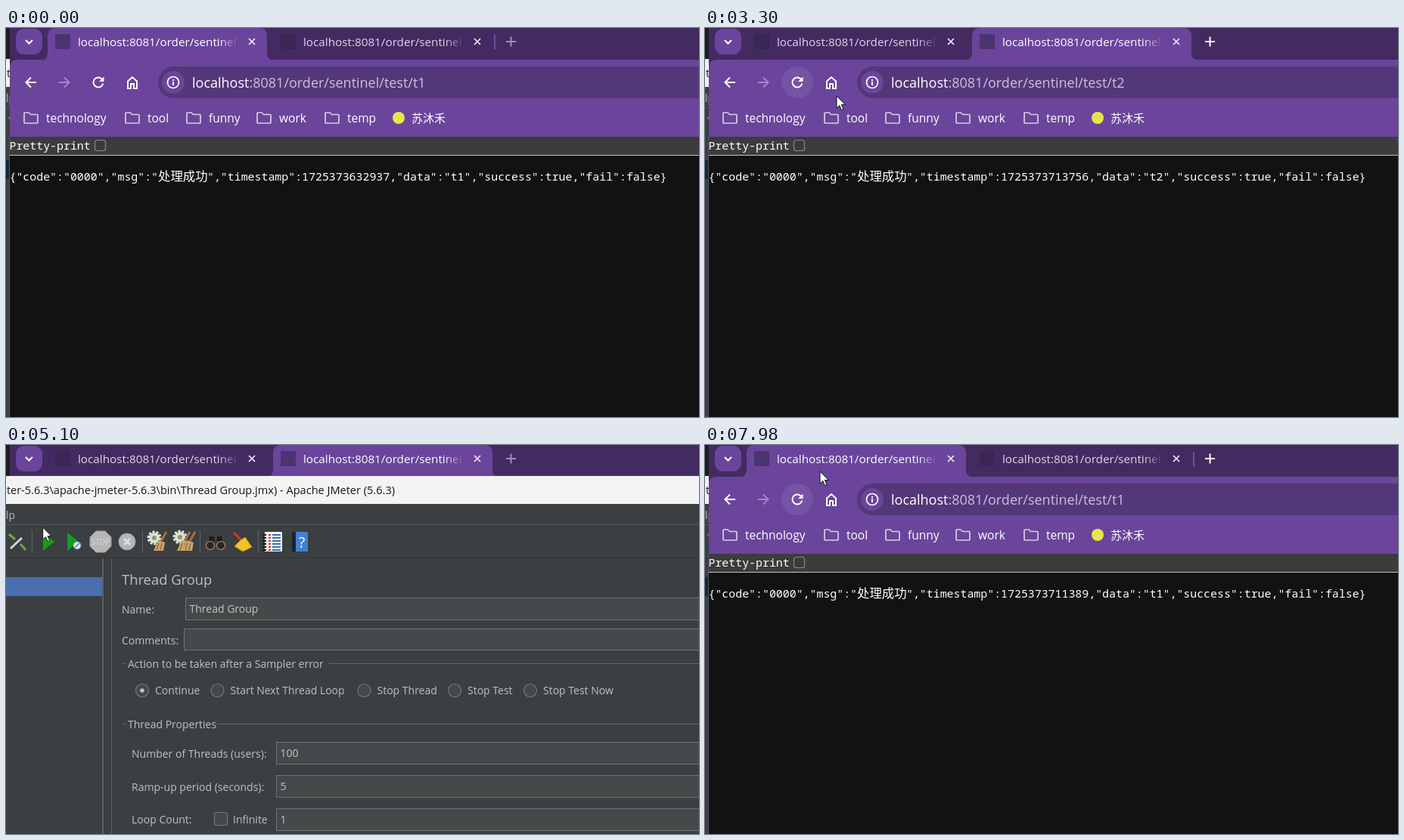
Write an HTML page with a canvas that moves like this. It is 916x515 px and loops after 8000 ms.

```html
<!DOCTYPE html>
<html lang="zh">
<head>
<meta charset="utf-8">
<title>Load test</title>
<style>
html, body { margin: 0; width: 100%; height: 100%; overflow: hidden; background: #121212; }
canvas { display: block; }
</style>
</head>
<body>
<canvas id="stage" width="916" height="515"></canvas>
<script>
const c = document.getElementById('stage').getContext('2d');
const SANS = '"Open Sans", "Noto Sans CJK SC", "Noto Sans CJK", sans-serif';
const MONO = '"Noto Sans Mono", "Noto Sans CJK SC", monospace';
const STRIP = '#432b62', PURPLE = '#6a459b', PILL = '#533879', HOVER = '#7653a4';
const LOOP = 8000, FRONT_ON = 4350, FRONT_OFF = 6120;

// Pointer keys: time, x, y
const paths = [
  [[60, 898, 496], [420, 520, 290], [720, 128, 80], [840, 121, 72], [900, 121, 72],
   [1170, 444, 14], [1680, 450, 13], [2040, 200, 112], [2370, 119, 74], [2940, 119, 74],
   [3300, 174, 90], [3690, 185, 60], [3840, 117, 28], [3990, 117, 28], [4290, 245, 530]],
  [[4560, 249, 452], [4980, 44, 96], [5250, 55, 127], [5430, 55, 127], [6000, 465, 12],
   [6270, 465, 12], [6660, 117, 90], [7050, 121, 72], [7410, 121, 72], [7650, 150, 13],
   [7780, 150, 13], [7980, 152, 35], [8000, 152, 35]]
];

function pointer(t) {
  for (const path of paths)
    for (let i = 1; i < path.length; i++) {
      const [t0, x0, y0] = path[i - 1], [t1, x1, y1] = path[i];
      if (t >= t0 && t < t1) {
        let u = (t - t0) / (t1 - t0);
        u = u * u * (3 - 2 * u);
        return [x0 + (x1 - x0) * u, y0 + (y1 - y0) * u];
      }
    }
  return [-99, -99];
}

function rect(x, y, w, h, color) {
  c.fillStyle = color;
  c.fillRect(x, y, w, h);
}
function round(x, y, w, h, r, fill, stroke, width = 1) {
  c.beginPath();
  c.roundRect(x, y, w, h, r);
  paint(fill, stroke, width);
}
function circle(x, y, r, fill, stroke, width = 1) {
  c.beginPath();
  c.arc(x, y, r, 0, 7);
  paint(fill, stroke, width);
}
function paint(fill, stroke, width) {
  if (fill) { c.fillStyle = fill; c.fill(); }
  if (stroke) { c.strokeStyle = stroke; c.lineWidth = width; c.stroke(); }
}
function shape(d, x, y, fill, stroke, width = 2) {
  const p = new Path2D(d);
  c.save();
  c.translate(x, y);
  if (fill) { c.fillStyle = fill; c.fill(p); }
  if (stroke) { c.strokeStyle = stroke; c.lineWidth = width; c.stroke(p); }
  c.restore();
}
function text(s, x, y, size, color, family = SANS, align = 'left') {
  c.font = size + 'px ' + family;
  c.textAlign = align;
  c.fillStyle = color;
  c.fillText(s, x, y);
}
const inside = ([x, y], x0, y0, x1, y1) => x >= x0 && x < x1 && y >= y0 && y < y1;

function tab(x, active, hover) {
  if (active)
    shape('M-11 43Q0 43 0 32V11Q0 0 11 0H279Q290 0 290 11V32Q290 43 301 43Z', x, 0, PURPLE);
  else if (hover)
    round(x, 0, 289, 35, 11, '#57397c');
  rect(x + 10, 8, 20, 20, active ? '#4b3570' : '#3a2854');
  const fade = c.createLinearGradient(x + 226, 0, x + 252, 0);
  fade.addColorStop(0, active ? '#fff' : '#ded6e8');
  fade.addColorStop(1, 'rgba(255,255,255,0)');
  text('localhost:8081/order/sentinel', x + 40, 24, 15.25, fade);
  shape('M-4 -4L4 4M4 -4L-4 4', x + 270, 18, null, '#f3eef8', 1.7);
}

const bookmarks = [['technology', 13, 129], ['tool', 147, 77], ['funny', 228, 90],
                   ['work', 321, 85], ['temp', 411, 86], ['苏沐禾', 500, 91]];

function browser(t, mouse, front) {
  const second = t >= 1350 && t < 7740;
  const focused = t >= 810 && t < 4410 || t >= FRONT_OFF;
  const tabHover = x => inside(mouse, x, 0, x + 290, 40);

  rect(5, 0, 911, 515, '#121212');
  rect(5, 0, 911, 52, STRIP);
  round(13, 1, 35, 34, 11, PURPLE);
  shape('M-4.5 -2L0 2.5L4.5 -2', 30.5, 18, null, '#fff', 2);
  tab(55, !second, tabHover(55));
  tab(353, second, tabHover(353));
  if (!second && !tabHover(353)) rect(645, 9, 2, 19, '#70509d');
  shape('M-6.5 0H6.5M0 -6.5V6.5', 667.5, 18, null, focused ? '#fff' : '#a18fb5', 2);

  shape('M0 10Q0 0 10 0H911V102H0Z', 5, 42, PURPLE);
  if (t >= 740 && t < FRONT_ON || t >= 6920) circle(122, 72, 21, HOVER);
  const arrow = 'M7 0H-6M0 -6.5L-6.5 0L0 6.5';
  shape(arrow, 33, 72, null, '#fff');
  c.save();
  c.translate(77, 72);
  c.scale(-1, 1);
  shape(arrow, 0, 0, null, '#a487c8');
  c.restore();
  c.beginPath();
  c.arc(122, 72, 6.5, 0.25, 5.6);
  paint(null, '#fff', 2);
  shape('M7.5 -7.5V-1H1Z', 122, 72, '#fff');
  shape('M-6 -1.5L0 -7L6 -1.5V8H2V2H-2V8H-6Z', 167, 72, null, '#fff');

  round(201, 51, 750, 42, 21, PILL);
  circle(221, 72, 15, PURPLE);
  circle(221, 72, 7.5, null, '#fff', 1.7);
  rect(220, 71, 2, 5, '#fff');
  rect(220, 68, 2, 2, '#fff');
  text('localhost', 246, 79, 18, '#fff');
  const host = c.measureText('localhost').width;
  const page = second ? 't2' : 't1';
  text(':8081/order/sentinel/test/' + page, 246 + host, 79, 18, '#cdc0dd');

  for (const [name, x, w] of bookmarks) {
    if (front && inside(mouse, x, 101, x + w, 137)) round(x, 101, w, 36, 18, HOVER);
    if (x < 500) shape('M1 2Q1 1 2 1H7L9.5 3.5H18Q19 3.5 19 4.5V14Q19 15 18 15H2Q1 15 1 14Z', x + 10, 111, null, '#d8cfe3', 1.7);
    else circle(519, 119, 8, '#e6e64a');
    text(name, x < 500 ? x + 40 : 536, 125, x < 500 ? 15.5 : 15, '#fff');
  }

  rect(5, 144, 911, 24, '#3c3c3c');
  rect(5, 168, 911, 1, '#c4c4c4');
  text('Pretty-print', 4.5, 161, 14.9, '#fff', MONO);
  round(117.5, 148.5, 14, 14, 3, '#3b3b3b', '#8a8a8a', 1.2);

  const stamp = second
    ? (t < 2970 ? 1725373634516 : t < 7170 ? 1725373713756 : 1725373717892)
    : (t < 870 ? 1725373632937 : 1725373711389);
  text('{"code":"0000","msg":"', 4.5, 202, 14.9, '#fff', MONO);
  text('处理成功', 201, 202, 16.4, '#fff');
  text(`","timestamp":${stamp},"data":"${page}","success":true,"fail":false}`, 266, 202, 14.9, '#fff', MONO);
  rect(4, 144, 1, 371, '#565656');
}

function broom(x, y) {
  shape('M9 -13L2 -1', x, y, null, '#a9713a', 3);
  shape('M-2 -2L7 1L5 12H-8Z', x, y, '#c9a36c');
  shape('M-1 2L-4 11M3 2L1 11', x, y, null, '#7d5a33', 1);
}
function gear(x, y) {
  c.setLineDash([3, 2]);
  circle(x, y, 8, null, '#e6e6e0', 3);
  c.setLineDash([]);
  circle(x, y, 7, '#deded8');
  circle(x, y, 3, '#79a852');
}

function toolbar(running) {
  const play = running ? '#aeb0b0' : '#11a01e';
  shape('M-1 10L14 -4', 7, 127, null, '#d2d6d6', 3);
  shape('M2 -9L10 -2', 2, 127, null, '#69a944', 3);
  shape('M12 4L19 12', 7, 127, null, '#69a944', 3);
  for (const x of [34, 180, 256, 333]) rect(x, 113, 1, 30, '#606365');

  shape('M-7 -12L8 0L-7 12Z', 56, 128, play);
  shape('M-8 -12L7 0L-8 12Z', 89, 128, play);
  circle(94, 133, 5, running ? '#b9baba' : '#e9eef4', running ? '#a5a6a6' : '#6d8fba', 1);
  if (!running) shape('M-3 3L3 -3', 94, 133, null, '#3f74b5', 1.5);

  shape('M-6 -14H6L14 -6V6L6 14H-6L-14 6V-6Z', 125, 128, running ? '#c9202e' : '#b5b5b5', running ? '#e3a0a5' : '#a2a2a2', 1);
  text('STOP', 125, 132, 10, running ? '#fff' : '#dadada', SANS, 'center');
  circle(160, 128, 11, running ? '#dc1f1f' : '#b5b5b5', running ? '#b91616' : '#a3a3a3');
  shape('M-4 -4L4 4M4 -4L-4 4', 160, 128, null, running ? '#fff' : '#dedede', 3);

  gear(196, 123);
  broom(203, 128);
  gear(230, 122);
  broom(234, 128);
  broom(241, 128);

  shape('M-11 7L-8 -7H-2L-1 7ZM1 7L2 -7H8L11 7Z', 277, 128, '#1c1c1c');
  for (const x of [270, 284]) circle(x, 133, 5.5, '#252525', '#8c7a69', 1.5);
  shape('M-11 -12L1 0', 312, 128, null, '#c23a26', 3.5);
  shape('M-2 -2L4 -6L13 7L1 13L-10 6Z', 312, 128, '#f0c22c', '#bd8a18', 1);

  round(342, 115, 23, 26, 1, '#f4f4f4');
  for (let y = 118; y < 139; y += 4) {
    rect(339, y, 5, 2, '#1b1b1b');
    rect(347, y, 3, 2, '#cc3a3a');
    rect(352, y, 11, 2, '#3c6fb6');
  }
  rect(379, 115, 20, 26, '#3f83d3');
  rect(378, 115, 5, 26, '#1b2430');
  text('?', 391, 136, 20, '#fff', SANS, 'center');
}

function field(x, y, h, value) {
  rect(x, y, 916 - x, h, '#707375');
  rect(x + 1, y + 1, 916 - x, h - 2, '#45494a');
  text(value, x + 5.5, y + 20, 14, '#c4c4c4');
}
function group(title, y, end) {
  rect(155, y, 4, 1, '#66696b');
  rect(end, y, 916 - end, 1, '#66696b');
  text(title, 161, y + 6, 14, '#c0c0c0');
}

const choices = [['Continue', 180], ['Start Next Thread Loop', 279.5], ['Stop Thread', 473.5],
                 ['Stop Test', 593], ['Stop Test Now', 693]];

function tester(t) {
  const grey = '#c0c0c0';
  rect(0, 41, 916, 474, '#3c3f41');
  rect(0, 41, 916, 37, '#f3f3f3');
  text('eter-5.6.3\\apache-jmeter-5.6.3\\bin\\Thread Group.jmx) - Apache JMeter (5.6.3)', 514, 65, 14.55, '#171717', SANS, 'right');
  text('lp', 0, 98, 14, '#a9bccb');
  rect(0, 105, 916, 1, '#55585a');
  rect(0, 149, 916, 1, '#303335');
  toolbar(t >= 5250);

  rect(0, 175, 127, 25, t >= 4560 && t < FRONT_OFF ? '#4b6eaf' : '#0d293e');
  rect(127, 150, 2, 365, '#5b5e60');
  rect(139, 150, 1, 365, '#5b5e60');

  text('Thread Group', 153, 185, 18.4, grey);
  text('Name:', 153, 223, 14, grey);
  field(237, 202, 30, 'Thread Group');
  text('Comments:', 153, 264, 14, grey);
  field(235, 243, 29, '');

  group('Action to be taken after a Sampler error', 289, 426);
  choices.forEach(([name, x], i) => {
    circle(x, 325, 8.5, '#43484a', '#75787a', 1.2);
    if (!i) circle(x, 325, 2.7, '#c4c4c4');
    text(name, x + 17, 330, 14, grey);
  });

  group('Thread Properties', 369, 279);
  text('Number of Threads (users):', 166, 414, 14, grey);
  field(357, 393, 30, '100');
  text('Ramp-up period (seconds):', 166, 458, 14, grey);
  field(357, 437, 30, '5');
  text('Loop Count:', 166, 501, 14, grey);
  round(275.5, 486.5, 17, 17, 3, '#43484a', '#75787a', 1.2);
  text('Infinite', 300, 501, 14, grey);
  field(357, 481, 30, '1');
}

function draw(now) {
  const t = now % LOOP;
  const mouse = pointer(t);
  const testerFront = t >= FRONT_ON && t < FRONT_OFF;
  rect(0, 0, 916, 515, '#1d1d1d');
  if (testerFront) {
    browser(t, mouse, false);
    tester(t);
  } else {
    tester(t);
    browser(t, mouse, true);
  }
  shape('M0 0V16L3.8 12.6L6.4 18.6L9 17.5L6.4 11.6H11.5Z', mouse[0], mouse[1], '#fff', '#111', 1);
  requestAnimationFrame(draw);
}
requestAnimationFrame(draw);
</script>
</body>
</html>
```
